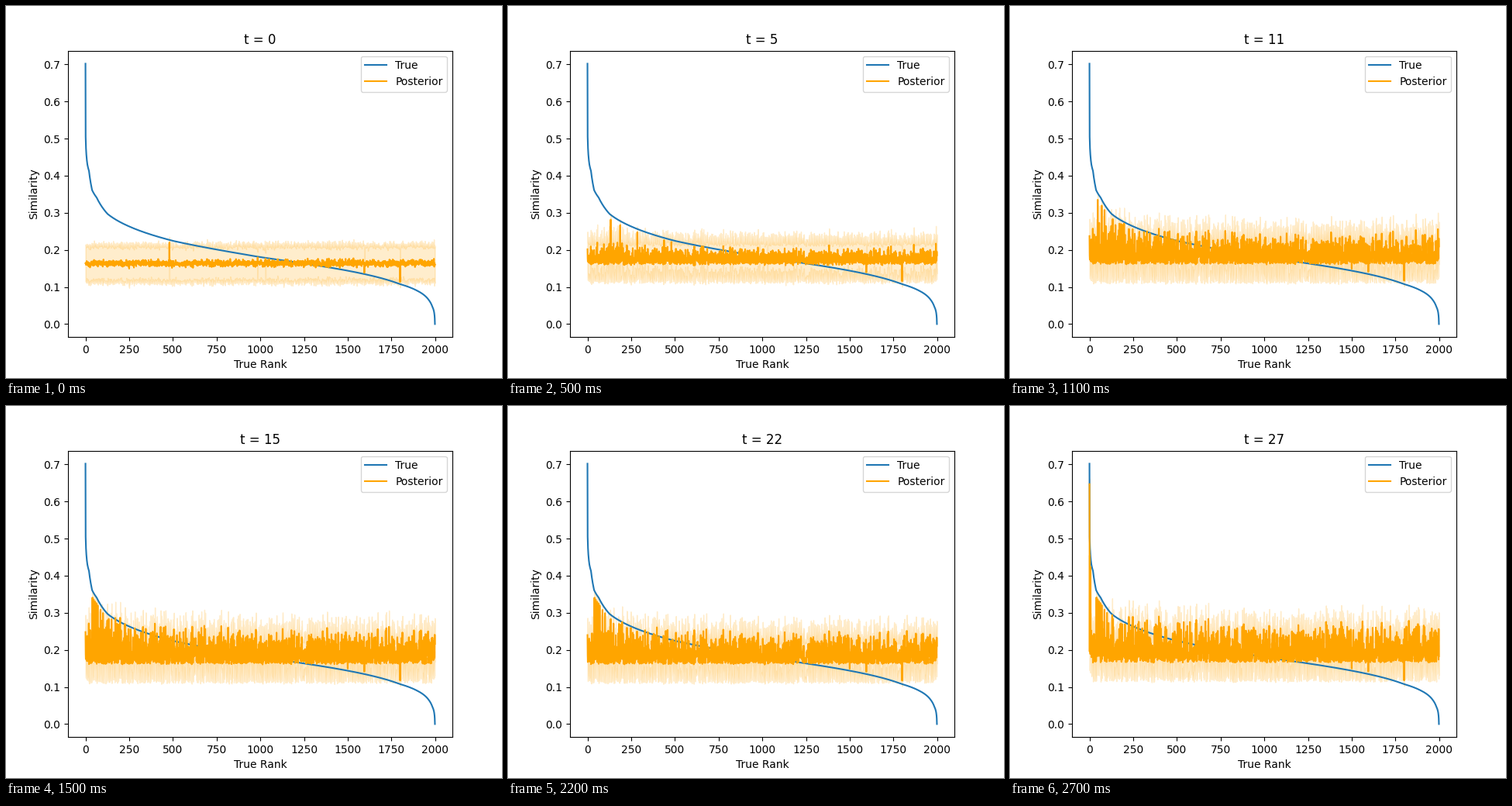
Write a matplotlib script that moves like this. It is 640 by 480 pixels and loops after 2800 ms.

```python
import numpy as np
import matplotlib.pyplot as plt
from matplotlib.animation import FuncAnimation

N = 2000
FRAMES = 28
PRIOR = 0.164
TOP_FOUND = 25
rank = np.arange(N)
rng = np.random.default_rng(7)


def logit(r):
    p = (np.asarray(r) + 0.5) / N
    return np.log(p / (1 - p))


# Sorted similarity: nearly straight between a few knots on a logit scale
knots = [(0, .702), (1, .505), (11, .43), (20, .413), (38, .361), (64, .341),
         (126, .297), (246, .264), (499, .2245), (1000, .1805), (1598, .1345),
         (1797, .108), (1895, .0905), (1966, .0635), (1984, .047), (1999, 0)]
knot_rank, knot_value = zip(*knots)
truth = np.interp(logit(rank), logit(knot_rank), knot_value)

# Five items are measured at the start, then one per step; the best come last
first = [480, 985, 1030, 1595, 1800]
later = [438, 285, 187, 133, 1500, 180, 47, 247, 70, 86, 40, 55, 62, 100]
measured = dict.fromkeys(first, 0)
measured.update((r, 2 + k) for k, r in enumerate(later))
measured.update((r, TOP_FOUND + k) for k, r in enumerate([0, 2, 6]))

jitter = rng.normal(0, 0.0045, N)
width_noise = rng.normal(0, 0.002, N)
early, late = rng.beta(0.85, 2.3, (2, N))
switch = rng.random(N)
early[0], switch[0] = 0.6, 1
gain = 1 + 0.35 * np.exp(-rank / 450)


def posterior(t):
    spread = np.interp(t, [0, 9, 15, 22, 27], [0, .085, .105, .095, .12])
    changed = np.interp(t, [9, 22, 27], [0, .35, .75])
    settled = min(t / 9, 1)
    rise = np.where(switch < changed, late, early)

    floor = PRIOR - 0.001 * settled + 0.004 * max(0, t - 22) / 5
    mean = floor + spread * gain * rise + jitter * (1 - 0.7 * settled)
    half = 0.049 + width_noise * (1 - 0.6 * settled)
    half = half + settled * (0.003 - 0.009 * rise)

    known = [r for r, start in measured.items() if t >= start]
    typical = PRIOR + 0.3 * spread
    mean[known] = typical + 0.89 * (truth[known] - typical)
    half[known] = 0.015
    return mean, half


def outline(mean, half):
    upper = np.column_stack([rank, mean + half])
    lower = np.column_stack([rank, mean - half])
    return np.vstack([lower, upper[::-1]])


fig, ax = plt.subplots(figsize=(6.4, 4.8), dpi=100)
mean, half = posterior(0)
ax.plot(rank, truth, label="True")
line, = ax.plot(rank, mean, color="orange", label="Posterior")
band = ax.fill_between(rank, mean - half, mean + half, color="orange", alpha=0.2)
ax.set_xlim(-99.95, 2098.95)
ax.set_ylim(-0.0351, 0.7371)
ax.set_xlabel("True Rank")
ax.set_ylabel("Similarity")
title = ax.set_title("t = 0")
ax.legend(loc="upper right")


def update(t):
    mean, half = posterior(t)
    line.set_ydata(mean)
    band.set_verts([outline(mean, half)])
    title.set_text(f"t = {t}")
    return line, band, title


anim = FuncAnimation(fig, update, frames=FRAMES, interval=100, repeat=True,
                     repeat_delay=0)
plt.show()
```
